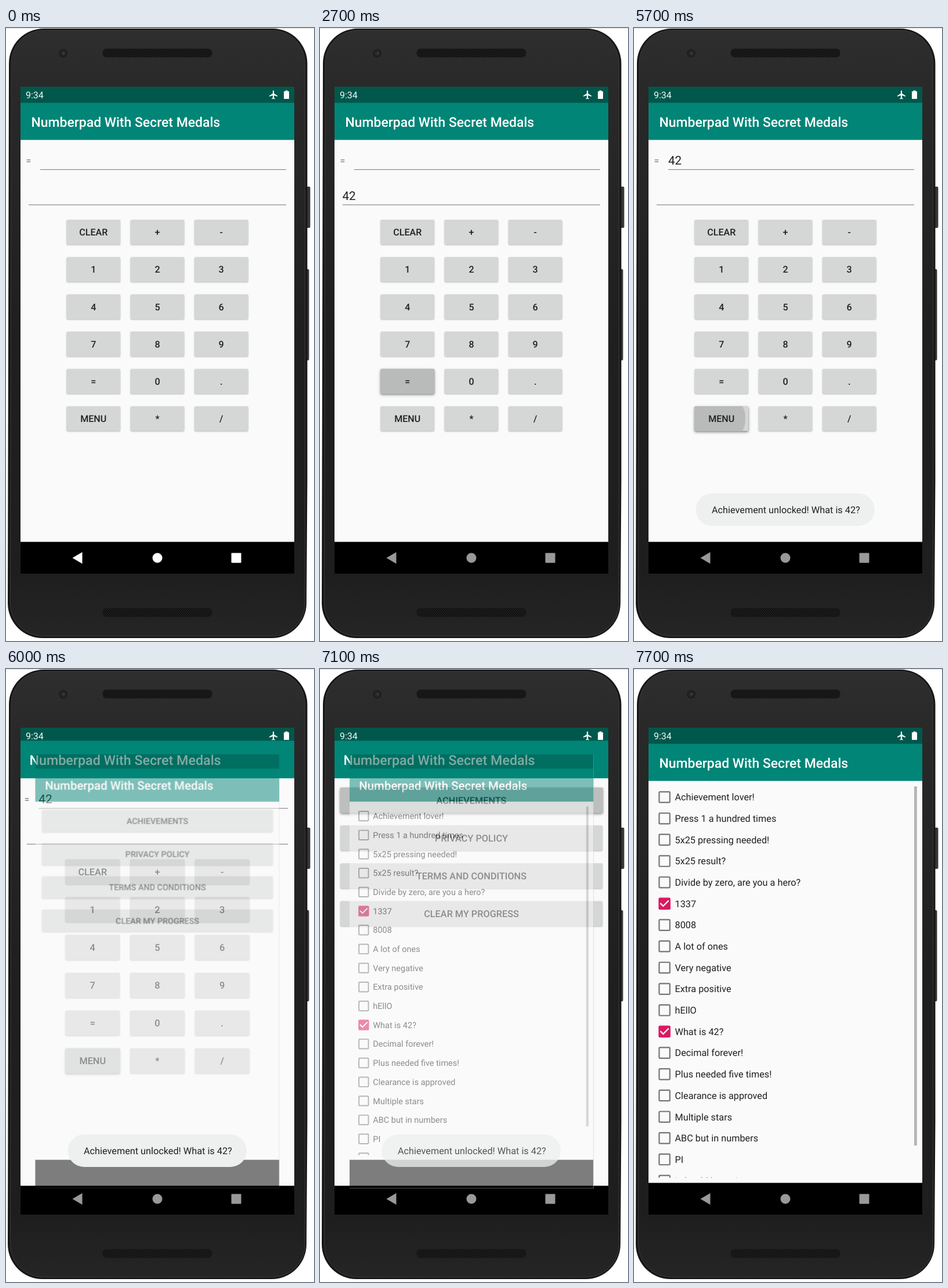
An HTML page that plays this animation: 531 px wide and 1055 px high, repeating every 8.7 s.

```html
<!DOCTYPE html>
<html lang="en">
<head>
<meta charset="utf-8">
<title>Calculator demo</title>
<style>
  html, body { margin: 0; width: 100%; height: 100%; overflow: hidden; background: #fff; }
  svg { display: block; }
  text {
    font-family: Roboto, "Noto Sans", sans-serif; fill: #1f2020;
    text-rendering: geometricPrecision;
  }
  .title { font-size: 22.95px; font-weight: 500; fill: #fff; }
  .label { font-size: 16.07px; font-weight: 500; text-anchor: middle; }
  .entry { font-size: 20.6px; }
  .item { font-size: 16.25px; }
  .key { fill: #d5d6d6; filter: drop-shadow(0 1px 1px #0004); }
  .rule { fill: #8a8a8a; }

  /* --t is the loop time in ms, --s a start and --d a duration */
  .show, .lift, .ripple, .toast, .nav {
    animation: on calc(var(--d) * 1ms) calc((var(--s) - var(--t)) * 1ms) linear paused;
  }
  .show, .lift, .ripple, .toast { opacity: 0; }
  .lift { animation-name: lift; }
  .lift rect { fill: #d5d6d6; filter: drop-shadow(0 2px 2.5px #0006); }
  .ripple {
    animation-name: ripple; fill: #b9baba;
    transform-box: fill-box; transform-origin: center;
  }
  .toast { animation-name: toast; }
  .nav { animation-name: dim; animation-fill-mode: both; fill: #fff; }
  .enter, .exit { transform-origin: 261px 520px; }
  .enter {
    animation:
      grow 400ms calc((var(--s) - var(--t)) * 1ms) both paused,
      appear 50ms calc((var(--s) + 35 - var(--t)) * 1ms) linear both paused;
  }
  .exit { animation: swell 400ms calc((var(--s) - var(--t)) * 1ms) both paused; }

  @keyframes on { from, to { opacity: 1; } }
  @keyframes lift { 0% { opacity: .3; } 18%, 60% { opacity: 1; } 100% { opacity: 0; } }
  @keyframes ripple {
    0% { transform: scale(.35); opacity: 1; }
    50% { transform: scale(1); opacity: 1; }
    100% { transform: scale(1); opacity: 0; }
  }
  @keyframes toast { 0% { opacity: 0; } 14%, 92% { opacity: 1; } 100% { opacity: 0; } }
  @keyframes dim { to { fill: #999; } }
  @keyframes appear { from { opacity: 0; } }
  @keyframes grow {
    0% { transform: scale(.85); animation-timing-function: cubic-bezier(.3, 0, .8, .15); }
    16.667% { transform: scale(.91); animation-timing-function: cubic-bezier(.05, .7, .1, 1); }
    100% { transform: scale(1); }
  }
  @keyframes swell {
    0% { transform: scale(1); animation-timing-function: cubic-bezier(.3, 0, .8, .15); }
    16.667% { transform: scale(1.02); animation-timing-function: cubic-bezier(.05, .7, .1, 1); }
    100% { transform: scale(1.05); }
  }
</style>
</head>
<body>
<svg width="531" height="1055" viewBox="0 0 531 1055">
  <defs>
    <linearGradient id="shell" x2="0" y2="1">
      <stop offset="0" stop-color="#2e2e2e"/>
      <stop offset=".1" stop-color="#292929"/>
      <stop offset=".5" stop-color="#1f1f1f"/>
      <stop offset=".9" stop-color="#1e1e1e"/>
      <stop offset="1" stop-color="#252525"/>
    </linearGradient>
    <pattern id="mesh" width="4" height="4" patternUnits="userSpaceOnUse">
      <rect width="4" height="4" fill="#101010"/>
      <circle cx="1" cy="1" r=".8" fill="#303030"/>
      <circle cx="3" cy="3" r=".8" fill="#303030"/>
    </pattern>
    <clipPath id="listArea"><rect x="25" y="193" width="472" height="682.5"/></clipPath>
  </defs>

  <rect width="531" height="1" fill="#dedede"/>
  <g id="phone">
    <rect x="516" y="273" width="8.5" height="71" rx="2" fill="#363636"/>
    <rect x="516" y="415" width="6.5" height="157" rx="2" fill="#363636"/>
    <path d="M65 1H459.500A60 60 0 0 1 519.500 61V778L518 990A60 60 0 0 1 458 1050H63A60 60 0 0 1 3 990L5 61A60 60 0 0 1 65 1Z" fill="#171717"/>
    <path d="M65 4H459.500A56 56 0 0 1 515.500 60V990A56 56 0 0 1 459.500 1046.500H63.500A56 56 0 0 1 7.500 990L9 60A56 56 0 0 1 65 4Z" fill="url(#shell)" stroke="#3a3a3a"/>
    <circle cx="98.500" cy="43.500" r="7.500" fill="#1f1f1f"/>
    <circle cx="98.500" cy="43.500" r="4.500" fill="#262829"/>
    <circle cx="99.500" cy="43.500" r="1.500" fill="#44474a"/>
    <rect x="167" y="36" width="188" height="14" rx="6" fill="url(#mesh)" stroke="#171717"/>
    <rect x="167" y="999" width="188" height="14" rx="6" fill="url(#mesh)" stroke="#171717"/>
  </g>

  <svg x="25" y="101" width="472" height="838" viewBox="25 101 472 838">
    <rect x="25" y="101" width="472" height="838"/>
    <g id="windows"></g>
    <g class="toast" style="--s:3220;--d:4130">
      <rect x="106.500" y="801" width="308.500" height="56" rx="28" fill="#eef0f0"/>
      <text class="item" x="134" y="835">Achievement unlocked! What is 42?</text>
    </g>
    <g fill="#fff">
      <text x="34" y="121" style="font-size:16px;fill:#f4f8f7">9:34</text>
      <path transform="translate(452.500 106.100) scale(.74)" d="M21 16v-2l-8-5V3.500a1.500 1.500 0 0 0-3 0V9l-8 5v2l8-2.500V19l-2 1.500V22l3.500-1 3.500 1v-1.500L13 19v-5.500z"/>
      <path d="M481.500 107.500h4v1.500h2.500v13h-9v-13h2.500z"/>
    </g>
    <rect x="25" y="904" width="472" height="35"/>
    <g class="nav" style="--s:300;--d:1200">
      <path d="M114.500 912L131.500 902V922Z"/>
      <circle cx="261" cy="912" r="8.500"/>
      <rect x="388.500" y="903.500" width="17" height="17" rx="1"/>
    </g>
  </svg>
</svg>
<script>
  const LOOP = 8700, STEP = 100;
  const PITCH = 64.2;
  const MENU_OPEN = 5940, LIST_OPEN = 7040;

  const timing = (start, length) => `style="--s:${start};--d:${length}"`;

  // press: { at: start time, x: touch point inside the key, r: full ripple radius }
  function button(x, y, w, label, press) {
    const box = `width="${w}" height="42.5" rx="2"`;
    let out = `<rect class="key" x="${x}" y="${y}" ${box}/>`;
    if (press) {
      const time = timing(press.at, 500);
      out += `<g class="lift" ${time}><rect x="${x}" y="${y}" ${box}/></g>
        <svg x="${x}" y="${y}" width="${w}" height="42.5">
          <circle class="ripple" ${time} cx="${press.x}" cy="21" r="${press.r}"/>
        </svg>`;
    }
    return out + `<text class="label" x="${x + w / 2}" y="${y + 27.2}">${label}</text>`;
  }

  const appWindow = content => `
    <rect x="25" y="101" width="472" height="838"/>
    <rect x="25" y="192" width="472" height="692.400" fill="#fafafa"/>
    <rect x="25" y="128" width="472" height="64.600" fill="#008577"/>
    <rect x="25" y="101" width="472" height="27.700" fill="#00574b"/>
    <text class="title" x="43.500" y="169.500">Numberpad With Secret Medals</text>
    ${content}`;

  const shown = (from, to, x, y, value) =>
    `<text class="entry show" ${timing(from, to - from)} x="${x}" y="${y}">${value}</text>`;

  function keypad() {
    const keys = ['CLEAR', '+', '-', 1, 2, 3, 4, 5, 6, 7, 8, 9, '=', 0, '.', 'MENU', '*', '/'];
    const presses = { 4: 510, 2: 1510, '=': 2510, MENU: 5610 };
    const pads = keys.map((key, i) => {
      const press = presses[key] && { at: presses[key], x: 41, r: 80 };
      return button(104.5 + i % 3 * 110.2, 330 + Math.floor(i / 3) * PITCH, 92.5, key, press);
    });
    return `
      <text x="34.500" y="234" style="font-size:16.070px;fill:#757575">=</text>
      <rect class="rule" x="59" y="243" width="424" height="1.200"/>
      <rect class="rule" x="39" y="303.800" width="444" height="1.200"/>
      ${shown(2800, LOOP, 59, 235.3, 42)}
      ${shown(700, 1700, 38.5, 295.8, 4)}
      ${shown(1700, 2800, 38.5, 295.8, 42)}
      ${pads.join('')}`;
  }

  function menu() {
    const labels = ['ACHIEVEMENTS', 'PRIVACY POLICY', 'TERMS AND CONDITIONS', 'CLEAR MY PROGRESS'];
    return labels.map((label, i) =>
      button(38, 208.5 + i * PITCH, 446, label, i ? null : { at: 6810, x: 223, r: 300 })).join('');
  }

  function checkbox(y, checked) {
    return checked
      ? `<rect x="42.300" y="${y - 10.3}" width="20.600" height="20.600" rx="2.300" fill="#d81b60"/>
         <path d="M45.400 ${y - .8}l4.900 4.900 9.500-9.500" fill="none" stroke="#fff" stroke-width="2.200"/>`
      : `<rect x="43.400" y="${y - 9.2}" width="18.400" height="18.400" rx="1.200" fill="none" stroke="#757575" stroke-width="2.200"/>`;
  }

  function list() {
    const items = ['Achievement lover!', 'Press 1 a hundred times', '5x25 pressing needed!',
      '5x25 result?', 'Divide by zero, are you a hero?', '1337', '8008', 'A lot of ones',
      'Very negative', 'Extra positive', 'hEllO', 'What is 42?', 'Decimal forever!',
      'Plus needed five times!', 'Clearance is approved', 'Multiple stars',
      'ABC but in numbers', 'PI', 'I should know it'];
    const rows = items.map((item, i) => {
      const y = 220.5 + i * 36.68;
      return checkbox(y, item === '1337' || item === 'What is 42?') +
        `<text class="item" x="70.500" y="${y + 5.8}">${item}</text>`;
    });
    return `<g clip-path="url(#listArea)">${rows.join('')}</g>
      <rect x="483" y="202" width="4.800" height="618" fill="#b5b5b5"/>`;
  }

  document.getElementById('windows').innerHTML = `
    <g class="exit" style="--s:${MENU_OPEN}">${appWindow(keypad())}</g>
    <g class="exit" style="--s:${LIST_OPEN}">
      <g class="enter" style="--s:${MENU_OPEN}">${appWindow(menu())}</g>
    </g>
    <g class="enter" style="--s:${LIST_OPEN}">${appWindow(list())}</g>`;

  const origin = performance.now();
  function tick() {
    const time = (performance.now() - origin) % LOOP;
    document.documentElement.style.setProperty('--t', Math.floor(time / STEP) * STEP);
    requestAnimationFrame(tick);
  }
  tick();
</script>
</body>
</html>
```
